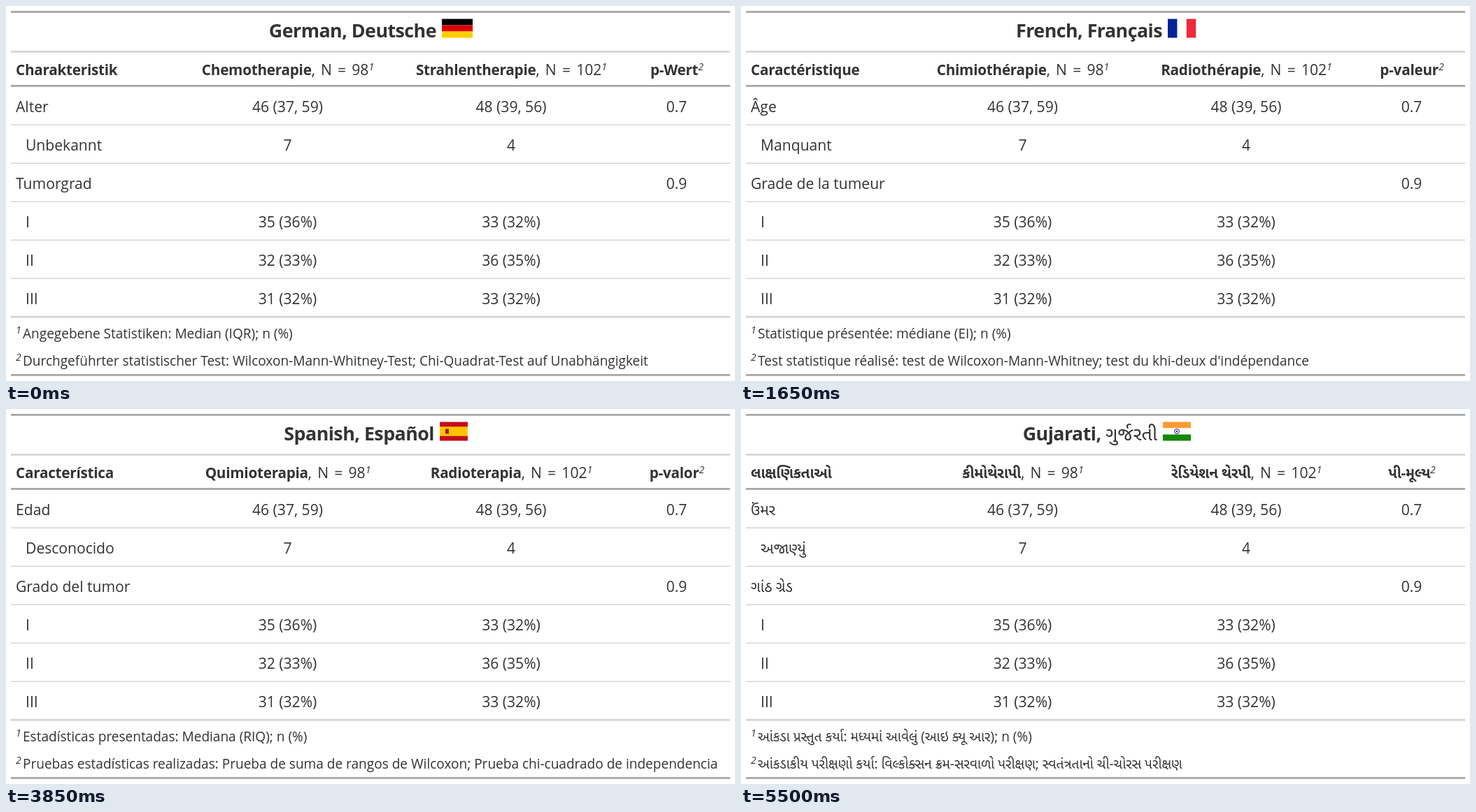
An HTML page for the animation above (6050 ms loop, 1042 by 537 pixels).

```html
<!DOCTYPE html>
<html lang="en">
<head>
<meta charset="utf-8">
<title>Table in many languages</title>
<style>
html, body { margin: 0; width: 100%; height: 100%; overflow: hidden; background: #fff; }
svg { display: block; width: 100%; height: 100%; }
text { font: 21.1px "Open Sans", "Noto Sans", "Noto Sans CJK TC", "Noto Sans Gujarati", "Noto Sans Devanagari", sans-serif; fill: #333; }
.ja text { font-family: "Open Sans", "Noto Sans CJK JP", sans-serif; font-feature-settings: "palt"; }
.cn text { font-family: "Open Sans", "Noto Sans CJK SC", sans-serif; }
.head { font-size: 20.7px; font-weight: 700; letter-spacing: -.012em; }
.title { font-size: 26.8px; font-weight: 700; letter-spacing: -.02em; }
.note { font-size: 19.05px; }
.mid { text-anchor: middle; }
.end { text-anchor: end; }
.count { font-size: 21.1px; font-weight: 400; letter-spacing: 0; word-spacing: 2.7px; }
.sup { font-size: 14px; font-weight: 400; font-style: italic; letter-spacing: 0; }
.wide { font-size: 104%; letter-spacing: 0; }
.head .wide { font-size: 107%; }
.kana { font-size: 104%; letter-spacing: -.12em; }
.soft { font-weight: 500; letter-spacing: 0; }
</style>
</head>
<body>
<svg viewBox="0 0 1042 537" preserveAspectRatio="none">
  <rect width="1042" height="537" fill="#fff"/>
  <g id="grid"></g>
  <g id="page"></g>
</svg>
<script>
const HOLD = 550;
const COLS = [402.5, 722, 958.5];
const rowY = i => 152 + 55 * i;

const rect = (x, y, w, h, fill) =>
  `<rect x="${x}" y="${y}" width="${w}" height="${h}" fill="${fill}"/>`;
const disc = (x, y, r, fill) => `<circle cx="${x}" cy="${y}" r="${r}" fill="${fill}"/>`;
const text = (x, y, cls, body) => `<text x="${x}" y="${y}" class="${cls}">${body}</text>`;
const sup = n => `<tspan class="sup" dy="-7">${n}</tspan>`;
const count = n => `<tspan class="count">, N = ${n}</tspan>`;
const soft = s => `<tspan class="soft">${s}</tspan>`;
// East Asian glyphs sit slightly larger than the Latin ones, kana tighter
const widen = s => s
  .replace(/[\u4e00-\u9fff]+/g, '<tspan class="wide">$&</tspan>')
  .replace(/[\u3040-\u30ff]+/g, '<tspan class="kana">$&</tspan>');

function star(x, y, r, inner, points, fill) {
  const pts = Array.from({ length: points * 2 }, (_, i) => {
    const a = Math.PI * (i / points - .5), d = i % 2 ? r * inner : r;
    return `${(x + d * Math.cos(a)).toFixed(2)},${(y + d * Math.sin(a)).toFixed(2)}`;
  });
  return `<polygon points="${pts.join(" ")}" fill="${fill}"/>`;
}

const bands = (w, colors) => colors.map((c, i) => rect(0, i * 9, w, 9, c)).join("");

// Flags are drawn from their own top left corner
const flags = {
  de: () => bands(44, ["#000", "#d00", "#ffce00"]),
  tw: () => rect(0, 0, 39, 27, "#fe0000") + rect(0, 0, 19.5, 13.5, "#000095") +
    star(9.7, 6.8, 5, .6, 12, "#fff") + disc(9.7, 6.8, 2.5, "#fff"),
  cn: () => rect(0, 0, 40, 27, "#de2910") + star(6.7, 6.8, 4, .38, 5, "#ffde00") +
    [[13.3, 2.7], [16, 5.4], [16, 9.5], [13.3, 12.2]]
      .map(([x, y]) => star(x, y, 1.4, .38, 5, "#ffde00")).join(""),
  fr: () => rect(0, 0, 13.4, 27, "#002395") + rect(26.8, 0, 13.4, 27, "#ed2939"),
  ja: () => disc(20.5, 13.5, 8, "#bc002d"),
  pt: () => rect(0, 0, 40, 27, "#f00") + rect(0, 0, 16, 27, "#060") +
    disc(16, 13.5, 6.3, "#e8d800") + disc(16, 13.5, 4.7, "#9a7a10") +
    rect(13.2, 10, 5.6, 6.6, "#e00000") + rect(14.5, 11.3, 3, 4, "#fff"),
  es: () => rect(0, 0, 40, 27, "#c60b1e") + rect(0, 6.75, 40, 13.5, "#ffc400") +
    rect(8, 10, 5, 7, "#ad1519"),
  se: () => rect(0, 0, 43, 27, "#006aa7") + rect(13.4, 0, 5.4, 27, "#fecc00") +
    rect(0, 10.8, 43, 5.4, "#fecc00"),
  in: () => bands(40, ["#f93", "#fff", "#128807"]) +
    `<circle cx="20" cy="13.5" r="3.5" fill="#e0e0f4" stroke="#000088" stroke-width=".8"/>` +
    disc(20, 13.5, 1.1, "#000088")
};

// head: four column titles; rows: age, unknown, grade; notes: two footnotes
const pages = [
  { flag: "de", x: 623, title: "German, Deutsche",
    head: ["Charakteristik", "Chemotherapie", "Strahlentherapie", "p-Wert"],
    rows: ["Alter", "Unbekannt", "Tumorgrad"],
    notes: ["Angegebene Statistiken: Median (IQR); n (%)",
      "Durchgeführter statistischer Test: Wilcoxon-Mann-Whitney-Test; Chi-Quadrat-Test auf Unabhängigkeit"] },
  { flag: "cn", x: 702, title: "Chinese (Simplified), " + soft("简体中文"),
    head: ["特征", "化疗", "放疗", "P " + soft("值")],
    rows: ["年龄", "未知", "肿瘤等级"],
    notes: ["统计: 中位数 (四分位距); n (%)", "统计检验: Wilcoxon 秩和检验; 卡方 独立性检验"] },
  { flag: "tw", x: 704.5, title: "Chinese (Traditional), " + soft("繁體中文"),
    head: ["特色", "化學療法", "放射治療", "P " + soft("值")],
    rows: ["年齡", "未知", "腫瘤等級"],
    notes: ["呈現的統計: 中位數 (四分位距); n (%)", "統計檢定: Wilcoxon 排序和檢定; 卡方 獨立性檢定"] },
  { flag: "fr", x: 610, title: "French, Français",
    head: ["Caractéristique", "Chimiothérapie", "Radiothérapie", "p-valeur"],
    rows: ["Âge", "Manquant", "Grade de la tumeur"],
    notes: ["Statistique présentée: médiane (EI); n (%)",
      "Test statistique réalisé: test de Wilcoxon-Mann-Whitney; test du khi-deux d'indépendance"] },
  { flag: "in", x: 585, title: "Hindi, " + soft("हिन्दी"),
    head: ["विशेषताएँ", "कीमोथेरेपी", "रेडियोथेरेपी", "पी-मूल्य"],
    rows: ["आयु", "अज्ञात", "ट्यूमर ग्रेड"],
    notes: ["प्रस्तुत आँकड़े: माध्यिका (आईक्यूआर); n (%)",
      "सांख्यिकीय परीक्षण: विलकॉक्सन रैंक-योग परीक्षण; स्वतंत्रता का काई-वर्ग परीक्षण"] },
  { flag: "ja", x: 614, title: "Japanese, 日本人",
    head: ["変数", "化学療法", "放射線治療", "P値"],
    rows: ["年齢", "不明", "腫瘍グレード"],
    notes: ["提示された統計: 中央値 (四分位範囲); n (%)", "実施された統計検定: Wilcoxonの順位和検定; カイ2乗検定"] },
  { flag: "pt", x: 655, title: "Portuguese, Português",
    head: ["Características", "Quimioterapia", "Radioterapia", "valor p"],
    rows: ["Era", "Desconhecido", "Grau de tumor"],
    notes: ["Estatisticas apresentadas: Mediana (IQR); n (%)",
      "Testes estatísticos realizados: Teste de soma de postos de Wilcoxon; Teste qui-quadrado de independência"] },
  { flag: "es", x: 620, title: "Spanish, Español",
    head: ["Característica", "Quimioterapia", "Radioterapia", "p-valor"],
    rows: ["Edad", "Desconocido", "Grado del tumor"],
    notes: ["Estadísticas presentadas: Mediana (RIQ); n (%)",
      "Pruebas estadísticas realizadas: Prueba de suma de rangos de Wilcoxon; Prueba chi-cuadrado de independencia"] },
  { flag: "se", x: 616.5, title: "Swedish, Svenska",
    head: ["Karakteristika", "Kemoterapi", "Strålterapi", "p-värde"],
    rows: ["Ålder", "Okänd", "Tumörklass"],
    notes: ["Statistikor presenterade: median (kvartilavstånd); n (%)",
      "Statistiska test utförda: Wilcoxon rangsumme test; chi-två test av oberoende"] },
  { flag: "in", x: 598, title: "Marathi, " + soft("मराठी"),
    head: ["वैशिष्ट्ये", "केमोथेरपी", "रेडिएशन थेरपी", "पी-मूल्य"],
    rows: ["वय", "अज्ञात", "ट्यूमर ग्रेड"],
    notes: ["सादर केलेली आकडेवारी: मध्यक (आयक्यूआर); n (%)",
      "सांख्यिकीय चाचण्या: विलकॉक्सन रँक-बेरीज चाचणी; स्वातंत्र्याची काय-वर्ग चाचणी"] },
  { flag: "in", x: 603, title: "Gujarati, " + soft("ગુર્જરતી"),
    head: ["લાક્ષણિકતાઓ", "કીમોથેરાપી", "રેડિયેશન થેરપી", "પી-મૂલ્ય"],
    rows: ["ઉંમર", "અજાણ્યું", "ગાંઠ ગ્રેડ"],
    notes: ["આંકડા પ્રસ્તુત કર્યા: મધ્યમાં આવેલું (આઇ ક્યૂ આર); n (%)",
      "આંકડાકીય પરીક્ષણો કર્યા: વિલ્કોક્સન ક્રમ-સરવાળો પરીક્ષણ; સ્વતંત્રતાનો ચી-ચોરસ પરીક્ષણ"] }
];

const cells = [
  ["46 (37, 59)", "48 (39, 56)", "0.7"],
  ["7", "4", ""],
  ["", "", "0.9"],
  ["35 (36%)", "33 (32%)", ""],
  ["32 (33%)", "36 (35%)", ""],
  ["31 (32%)", "33 (32%)", ""]
];

function drawGrid() {
  const line = (y, h, fill) => rect(7, y - h / 2, 1028, h, fill);
  let out = line(8.4, 2.8, "#a8a8a8") + line(528.4, 2.8, "#a8a8a8") +
    line(65.4, 2.6, "#d3d3d3") + line(114.4, 2.8, "#a8a8a8") + line(445.2, 2.8, "#d3d3d3");
  for (let i = 0; i < 5; i++) out += line(170.2 + 55 * i, 1.4, "#d3d3d3");
  cells.forEach((row, i) => row.forEach((s, j) => {
    if (s) out += text(COLS[j], rowY(i), "mid", s);
  }));
  ["I", "II", "III"].forEach((s, i) => { out += text(28, rowY(i + 3), "", s); });
  return out;
}

function drawPage(p) {
  const [label, chemo, radio, pval] = p.head.map(widen);
  const heads = [chemo + count(98) + sup(1), radio + count(102) + sup(1), pval + sup(2)];
  return text(p.x - 8, 45, "title end", widen(p.title)) +
    `<g transform="translate(${p.x} 18.5)">${flags[p.flag]()}</g>` +
    text(14, 98.5, "head", label) +
    heads.map((s, j) => text(COLS[j] + .5, 98.5, "head mid", s)).join("") +
    p.rows.map((s, i) => text(i === 1 ? 28 : 14, rowY(i), "", widen(s))).join("") +
    p.notes.map((s, i) => text(14, 469 + 39 * i, "sup", i + 1) +
      text(24, 476 + 39 * i, "note", widen(s))).join("");
}

const grid = document.getElementById("grid");
const page = document.getElementById("page");
const views = pages.map(drawPage);
let shown = -1;

function show(t) {
  const i = Math.floor(t / HOLD) % pages.length;
  if (i === shown) return;
  shown = i;
  page.setAttribute("class", pages[i].flag);
  page.innerHTML = views[i];
}

grid.innerHTML = drawGrid();
const start = performance.now();
function tick() {
  show(performance.now() - start);
  requestAnimationFrame(tick);
}
tick();
</script>
</body>
</html>
```
